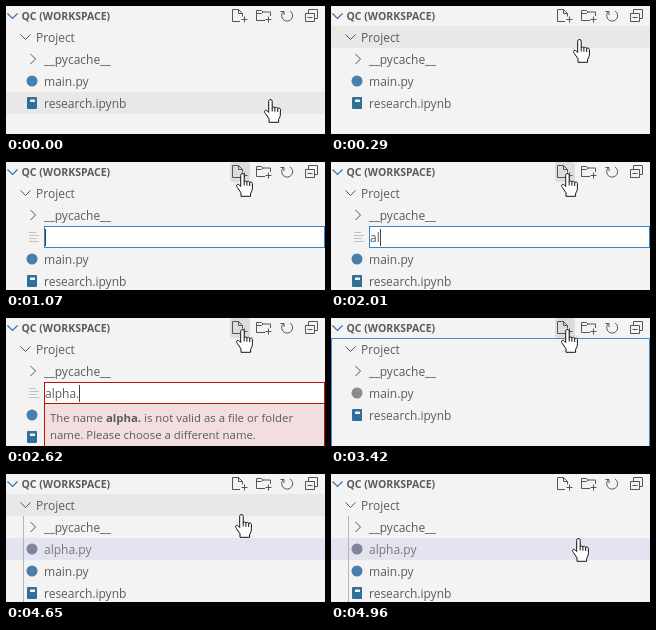
Write an HTML page that moves like this. It is 319x128 px and loops after 5.13 s.

```html
<!DOCTYPE html>
<html lang="en">
<head>
<meta charset="utf-8">
<title>New file in the explorer</title>
<style>
  html, body { margin: 0; width: 100%; height: 100%; overflow: hidden; background: #f3f3f3; }
  svg { display: block; }
  text { font: 12px "Open Sans", "Noto Sans", sans-serif; fill: #5c5c5c; white-space: pre; }
  .title { font-size: 10.5px; font-weight: 700; }
  .message text { font-size: 11.4px; }
  .bold { font-weight: 700; }
  .line { fill: none; stroke: #555; stroke-width: 1; }
  .fold { stroke: #3b6ea5; stroke-width: 1.2; }
  .py { fill: #4a7fab; }
  .book { fill: #2f7099; }
  .dim .py { fill: #8b8b8f; }
  #alpha .py { fill: #80859c; }
  #alpha text { fill: #77777d; }
</style>
</head>
<body>
<svg width="319" height="128" viewBox="0 0 319 128">
  <rect width="319" height="128" fill="#f3f3f3"/>
  <rect id="hover" width="319" height="22" fill="#e8e8e8"/>
  <rect id="button" x="224" width="20" height="20" rx="3" fill="#dcdcdc"/>

  <path class="line fold" d="M1.500 7.500l5 5 5-5"/>
  <text class="title" x="15.500" y="14">QC (WORKSPACE)</text>

  <g class="line">
    <path d="M234 15.500h-7.500v-12h6l4 4v3M232.500 3.500v4h4M238.500 10.500v6M235.500 13.500h6"/>
    <path d="M259 14.500h-8.500v-10h5l1.500 1.500h7.500v4M250.500 7.500h5l1.500-1.500M262.500 10.500v6M259.500 13.500h6"/>
    <path d="M277.500 5.500a5.500 5.500 0 1 0 6.500-.6M274.500 5.500h3.500v3.500"/>
    <path d="M299.500 7.500h9v8h-9zM302.500 7v-3.500h9v9h-3M301.500 11.500h5"/>
  </g>

  <g transform="translate(0 20)">
    <path class="line" d="M14.500 8.500l5 5 5-5"/>
    <text x="30" y="16">Project</text>
  </g>
  <g transform="translate(0 42)">
    <path class="line" d="M24.500 6l5 5-5 5"/>
    <text x="38" y="16">__pycache__</text>
  </g>
  <g id="alpha" transform="translate(0 64)">
    <rect width="319" height="22" fill="#e4e4f0"/>
    <circle class="py" cx="26" cy="11" r="5.500"/>
    <text x="38" y="16">alpha.py</text>
  </g>
  <g id="main">
    <circle class="py" cx="26" cy="11" r="5.500"/>
    <text x="38" y="16">main.py</text>
  </g>
  <g id="research">
    <path class="book" fill-rule="evenodd" d="M22 5h8q1 0 1 1v10q0 1-1 1H22q-1 0-1-1V6q0-1 1-1zM24 7.500v2.500h5V7.500z"/>
    <text x="38" y="16">research.ipynb</text>
  </g>
  <path id="guide" d="M17.500 42v86" stroke="#b5b5b5"/>

  <g id="edit">
    <path id="lines" d="M23 70.500h7M23 73.500h10M23 76.500h8M23 79.500h10" stroke="#c0c3c4"/>
    <circle id="typed" class="py" cx="26" cy="75" r="5.500"/>
    <rect id="box" x="38.500" y="64.500" width="280" height="21" fill="#fff"/>
    <text id="name" x="39" y="80"></text>
    <rect id="caret" y="67" width="1" height="17" fill="#444"/>
    <g id="error" class="message">
      <rect x="38.500" y="85.500" width="280" height="43" fill="#f2dede" stroke="#be1100"/>
      <text x="44" y="104">The name <tspan class="bold">alpha.</tspan> is not valid as a file or folder</text>
      <text x="44" y="121">name. Please choose a different name.</text>
    </g>
  </g>

  <path id="focus" d="M.5 128V20.500h318V128" fill="none" stroke="#3c8fd6"/>

  <g id="hand" stroke="#111" stroke-linejoin="round" stroke-linecap="round">
    <path fill="#fff" d="M6.500.5C5.300.5 4.700 1.300 4.700 2.400V13.500L3.200 11.900C2.300 11 .9 11.200.6 12.200.4 13 .8 13.700 1.300 14.400L5 19.800V23.300H14.600V20.300C15.900 18.500 16.400 16.800 16.400 14.800V10.400C16.400 9 14.600 8.600 13.700 9.600 13.600 8.200 11.500 7.900 10.900 9 10.500 7.800 8.800 7.600 8.200 8.600V2.400C8.200 1.300 7.700.5 6.500.5Z"/>
    <path fill="none" d="M8.200 8.600v3.500M10.900 9v3.300M13.700 9.600v3"/>
  </g>
</svg>
<script>
const LOOP = 5130, TICK = 30;
const $ = id => document.getElementById(id);
const show = (id, on) => $(id).setAttribute('visibility', on ? 'inherit' : 'hidden');
const move = (id, x, y) => $(id).setAttribute('transform', `translate(${x} ${y})`);

const linear = p => p;
const easeIn = p => p * p;
const easeOut = p => 1 - (1 - p) * (1 - p);

// time, x, y, easing towards this point
const path = [
  [20, 258, 93, linear],
  [290, 242, 33, linear],
  [580, 230, 11, easeOut],
  [4440, 230, 11, linear],
  [4640, 229, 40, easeIn],
  [4940, 241, 64, easeOut]
];
const keys = [1840, 2010, 2220, 2340, 2450, 2620, 2820, 2950];

function pointer(t) {
  const q = Math.floor((t + 10) / TICK) * TICK - 10;
  const i = path.findIndex(k => k[0] > q);
  if (i === 0) return path[0].slice(1, 3);
  if (i < 0) return path[path.length - 1].slice(1, 3);
  const [t0, x0, y0] = path[i - 1], [t1, x1, y1, ease] = path[i];
  const p = ease((q - t0) / (t1 - t0));
  return [Math.round(x0 + (x1 - x0) * p), Math.round(y0 + (y1 - y0) * p)];
}

function draw(t) {
  const within = (a, b) => t >= a && t < b;
  const editing = within(960, 3420), created = t >= 3520;
  const shift = editing || created ? 22 : 0;

  const [x, y] = pointer(t);
  move('hand', x, y);
  const row = Math.floor((y - 20) / 22);
  show('hover', row >= 0);
  $('hover').setAttribute('y', 20 + row * 22);
  show('button', y < 20);

  move('main', 0, 64 + shift);
  move('research', 0, 86 + shift);
  $('main').classList.toggle('dim', within(3420, 3600));
  show('alpha', created);
  show('guide', created);
  show('focus', within(900, 960) || within(3420, 3680));

  const count = keys.filter(k => t >= k).length;
  const bad = within(2620, 2820);
  show('edit', editing);
  show('lines', count < 8);
  show('typed', editing && count === 8);
  show('error', bad);
  $('box').setAttribute('stroke', bad ? '#be1100' : '#2f86d2');
  $('name').textContent = 'alpha.py'.slice(0, count);
  show('caret', editing && t >= 1070 && !within(1610, 1840));
  $('caret').setAttribute('x', Math.round(39 + (count ? $('name').getComputedTextLength() : 0)));
}

function frame() {
  draw(performance.now() % LOOP);
  requestAnimationFrame(frame);
}
frame();
</script>
</body>
</html>
```
